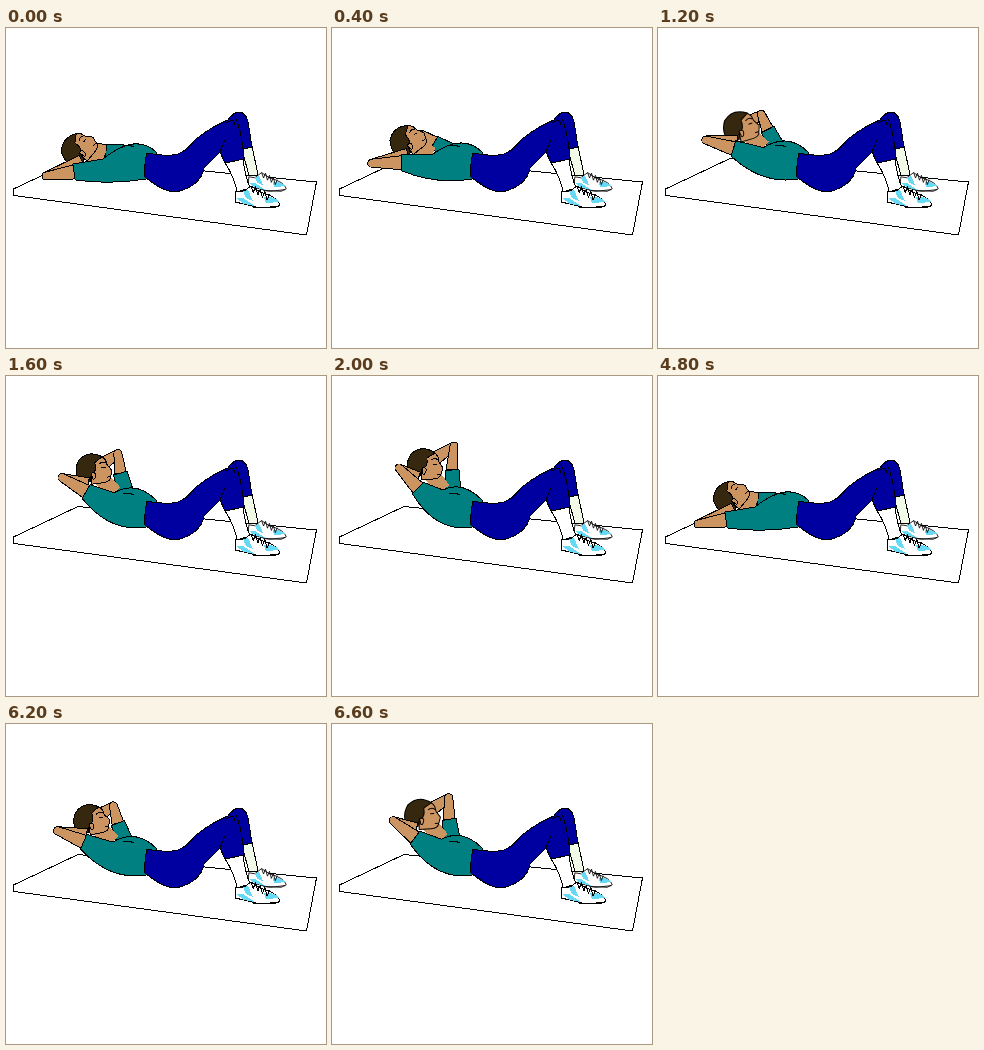
An HTML page that plays this animation: 320x320 px, repeating every 10000 ms.

```html
<!DOCTYPE html>
<html lang="en">
<head>
<meta charset="utf-8">
<title>Crunch exercise</title>
<style>
  html, body { margin: 0; width: 100%; height: 100%; overflow: hidden; background: #fff; }
  svg { display: block; width: 320px; height: 320px; }
  path { stroke: #000; stroke-width: 1; stroke-linejoin: round; fill: none; }
  .skin { fill: #cc9460; }
  .teal { fill: #008080; }
  .blue { fill: #0000a0; }
  .hair { fill: #35280f; }
  .white { fill: #fff; }
  .pale { fill: #f0fae6; }
  .cyan { fill: #66d9f5; }
  .plain { stroke: none; }
</style>
</head>
<body>
<svg viewBox="0 0 320 320" shape-rendering="crispEdges">
  <defs>
    <g id="shoe">
      <path class="white" d="M0 12L1 1L8 2L16-4L25 2Q43 7 45 15L39 18L21 17L9 14Z"/>
      <path class="cyan plain" d="M1 8H8L20 16L9 14ZM8 1L13 0L18 11L11 8ZM29 7Q40 6 44 12L31 13Z"/>
      <path class="laces"/>
      <path d="M18 17L26 18L44 16" stroke-width="1.4"/>
    </g>
  </defs>

  <path class="white" stroke-width=".9" d="M7.5 161L72 130.5L310.5 154L300.5 207L8 167.5Z"/>

  <path class="pale" d="M236 121L243 148L252 147L246 118Z"/>
  <use href="#shoe" transform="translate(242 148) scale(.85)"/>
  <path class="white" d="M218 133Q229 150 231 164L244 160Q239 148 237 131Z"/>
  <use href="#shoe" transform="translate(229 162)"/>

  <path id="farForearm" class="skin"/>
  <path id="farUpperArm" class="skin"/>
  <path id="farSleeve" class="teal"/>
  <path id="neck" class="skin plain"/>
  <g id="head">
    <path class="skin" d="M-2-12Q9-16 13-8L14-3L18 3L16 9Q15 14 8 14H-4Z"/>
    <path class="hair" d="M10-12Q-3-21-14-11Q-22 2-13 12L-5 11L-3 4Q3 3 2-7Z"/>
    <path class="skin" stroke-width=".7" d="M-3 3Q2 2 1 6T-2 9Z"/>
    <path d="M6-5Q10-8 13-5M8-1H12M12 9H16"/>
  </g>
  <path id="forearm" class="skin"/>
  <path id="upperArm" class="skin"/>
  <path id="shirt" class="teal"/>
  <path stroke-width=".8" d="M117 118L123 117L128 119"/>

  <path class="blue" d="M141 125Q160 129 172 126Q180 123 190 111Q208 97 222 92Q227 84 234 84
    Q242 86 243 100L246 119L237 121L238 131L219 135L214 124L198 140Q195 158 170 164Q157 164 139 149Q138 136 141 125Z"/>
  <path d="M229 88Q235 102 237 121M219 95L227 92L229 97M214 124L219 112M172 126L182 121"/>
</svg>
<script>
const LOOP = 10000, STEP = 200, RESTART = 4800;

// Each joint swings along a quadratic curve: lying, control, raised.
const joints = {
  elbow:    [[40, 148], [36, 115], [67, 92]],
  hand:     [[75, 131], [75, 114], [87, 100]],
  cuff:     [[68, 144], [70, 119], [86, 112]],
  farElbow: [[86, 118], [95, 88],  [122, 70]],
  farCuff:  [[100, 123], [105, 100], [120, 94]],
  farChest: [[118, 125], [118, 120], [121, 116]],
  collar:   [[97, 131], [104, 120], [111, 114]],
  head:     [[73, 121], [79, 100], [93, 89]],
  tilt:     [[-50], [-17], [0]]
};

const byId = id => document.getElementById(id);
const swing = ([a, b, c], u) =>
  a.map((v, i) => (1 - u) ** 2 * v + 2 * u * (1 - u) * b[i] + u * u * c[i]);

// Offset of half the limb's width, at right angles to the line from a to b.
function side(a, b, width) {
  const dx = b[0] - a[0], dy = b[1] - a[1], k = width / Math.hypot(dx, dy);
  return [-dy * k, dx * k];
}
const add = (p, q, sign = 1) => p.map((v, i) => v + sign * q[i]);

// Tapered limb, flat at b and optionally rounded at a.
function limb(id, a, b, widthA, widthB, rounded = true) {
  const sa = side(a, b, widthA), sb = side(a, b, widthB);
  const end = rounded ? `A${widthA} ${widthA} 0 0 1 ` : 'L';
  byId(id).setAttribute('d',
    `M${add(a, sa)}${end}${add(a, sa, -1)}L${add(b, sb, -1)}L${add(b, sb)}Z`);
}

function draw(u) {
  const j = {};
  for (const name in joints) j[name] = swing(joints[name], u);

  limb('farForearm', j.farElbow, j.head, 4, 8);
  limb('farUpperArm', j.farElbow, j.farCuff, 4, 6);
  limb('farSleeve', j.farCuff, j.farChest, 7, 8, false);
  limb('neck', j.head, j.collar, 8, 8, false);
  limb('forearm', j.elbow, j.hand, 4, 4);
  limb('upperArm', j.elbow, j.cuff, 4, 7);
  byId('head').setAttribute('transform', `translate(${j.head}) rotate(${j.tilt})`);

  const edge = side(j.elbow, j.cuff, 8);
  byId('shirt').setAttribute('d',
    `M${add(j.cuff, edge, -1)}L${j.collar}Q131 104 151 125L140 151Q104 157 ${add(j.cuff, edge)}Z`);
}

function lacePath() {
  let d = 'M16-4';
  for (let i = 1; i < 9; i++) d += `L${16 + i * 2.3} ${-4 + i * 1.3 + (i % 2 ? 5 : -2)}`;
  return d;
}
document.querySelector('.laces').setAttribute('d', lacePath());

function frame() {
  const t = performance.now() % LOOP;
  const step = t < RESTART ? Math.min(10, Math.floor(t / STEP))
                           : Math.min(9, Math.floor((t - RESTART) / STEP));
  draw(step / 10);
  requestAnimationFrame(frame);
}
frame();
</script>
</body>
</html>
```
